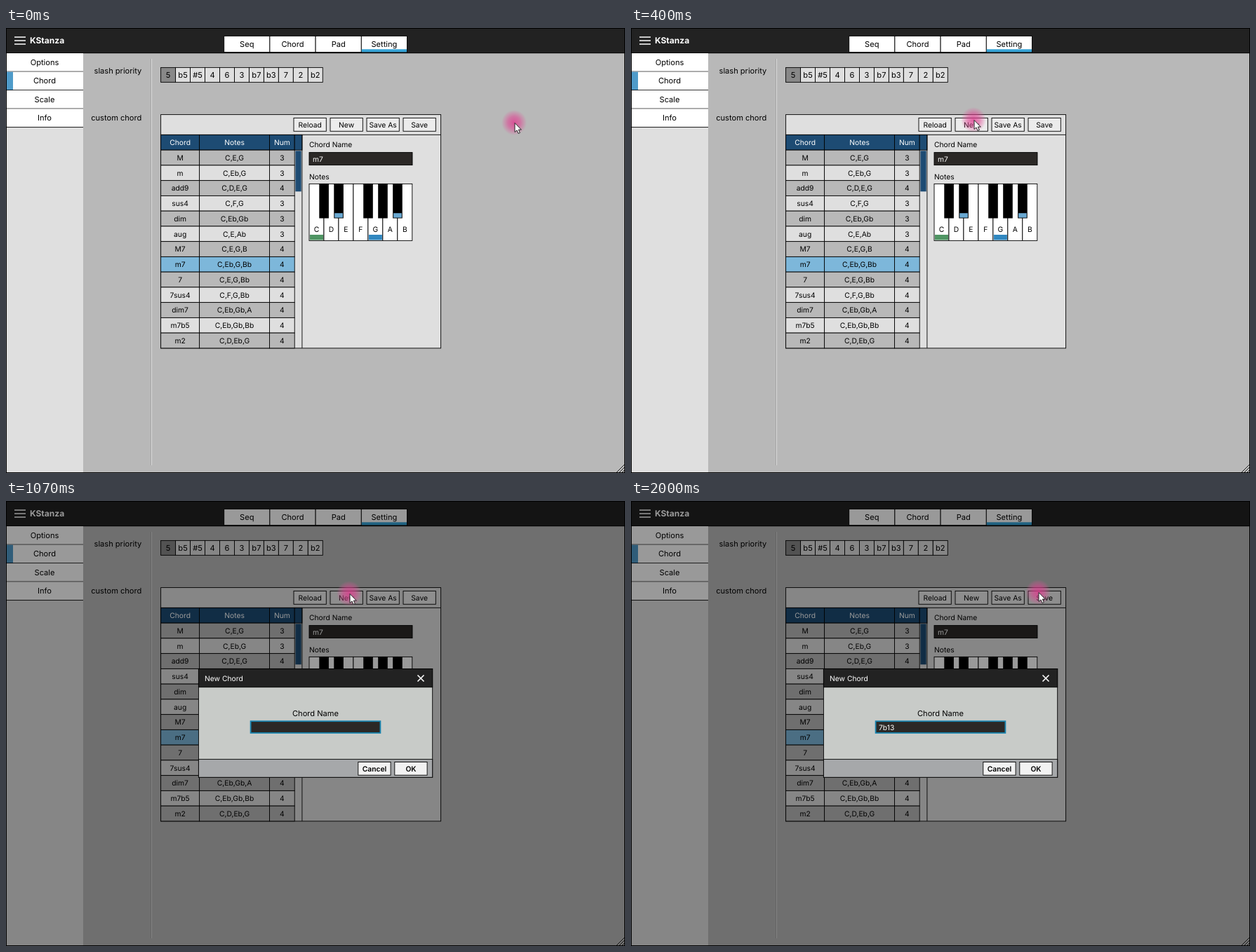
Animation, 882 px wide and 635 px high, one loop 2.07 s. Source, as an HTML page with a canvas:

```html
<!DOCTYPE html>
<html lang="en">
<head>
<meta charset="utf-8">
<title>Chord settings</title>
<style>
html, body { margin: 0; width: 100%; height: 100%; overflow: hidden; background: #b8b8b8; }
canvas { display: block; }
</style>
</head>
<body>
<canvas id="stage" width="882" height="635"></canvas>
<script>
const ctx = document.getElementById('stage').getContext('2d');
ctx.textRendering = 'geometricPrecision';
const LOOP = 2070, SMALL = 10.3, MEDIUM = 11.1, HAIR = 0.9;
const NAVY = '#1d4b73', PANEL = '#dfdfdf', GREY = '#b8b8b8', INK = '#2b2826';
const KEY = 20.97, ROW = 21.75, ITEM = 26.46;

// Pointer stops: time, x, y
const stops = [
  [0, 724, 135], [70, 590, 130], [140, 487, 128], [200, 479, 130], [270, 483, 131],
  [400, 488, 131], [600, 489, 132], [1940, 535, 131], [2000, 580, 130]
];
const chords = [
  'M C,E,G', 'm C,Eb,G', 'add9 C,D,E,G', 'sus4 C,F,G', 'dim C,Eb,Gb', 'aug C,E,Ab', 'M7 C,E,G,B',
  'm7 C,Eb,G,Bb', '7 C,E,G,Bb', '7sus4 C,F,G,Bb', 'dim7 C,Eb,Gb,A', 'm7b5 C,Eb,Gb,Bb', 'm2 C,D,Eb,G'
].map(row => row.split(' '));

function fill(x, y, w, h, color) {
  ctx.fillStyle = color;
  ctx.fillRect(x, y, w, h);
}

// x, y, w and h follow the middle of the outline
function box(x, y, w, h, color) {
  fill(x, y, w, h, color);
  ctx.strokeStyle = '#000';
  ctx.lineWidth = HAIR;
  ctx.strokeRect(x, y, w, h);
}

function text(str, x, y, size = SMALL, color = '#000', align = 'center', weight = 400) {
  ctx.font = `${weight} ${size}px Inter, sans-serif`;
  ctx.textAlign = align;
  ctx.fillStyle = color;
  ctx.fillText(str, x, y + size * 0.364);
}

function line(x1, y1, x2, y2, color = '#000', width = HAIR) {
  ctx.strokeStyle = color;
  ctx.lineWidth = width;
  ctx.beginPath();
  ctx.moveTo(x1, y1);
  ctx.lineTo(x2, y2);
  ctx.stroke();
}

function drawHeader() {
  fill(0, 0, 882, 36, '#222');
  for (const y of [13, 18, 23]) line(12, y, 28, y, '#fff', 1.5);
  text('KStanza', 34, 18, 12, '#fff', 'left', 700);
  ['Seq', 'Chord', 'Pad', 'Setting'].forEach((label, i) => {
    const x = 310.7 + i * 65.2;
    box(x, 11.4, 65.2, 23.2, '#fff');
    if (i === 3) fill(x + 0.5, 30.3, 64.2, 4, '#36a3d6');
    text(label, x + 32.6, 23, MEDIUM);
  });
  line(0, 35.7, 882, 35.7);
}

function drawSidebar() {
  fill(0, 36, 110, 599, PANEL);
  ['Options', 'Chord', 'Scale', 'Info'].forEach((label, i) => {
    const y = 35.7 + i * ITEM;
    fill(0, y + 0.4, 110, ITEM, '#fff');
    if (i === 1) fill(1, y + 0.4, 9, ITEM, '#4f9bc9');
    line(0, y + ITEM, 110, y + ITEM);
    text(label, 55, y + ITEM / 2, MEDIUM);
  });
}

function drawPriority() {
  fill(206, 44, 1, 580, '#a4a4a4');
  fill(207, 44, 1, 580, '#dcdcdc');
  text('slash priority', 193.3, 61, MEDIUM, '#000', 'right');
  text('custom chord', 193.3, 128, MEDIUM, '#000', 'right');
  '5 b5 #5 4 6 3 b7 b3 7 2 b2'.split(' ').forEach((label, i) => {
    const x = 220.6 + i * KEY;
    box(x, 56.4, KEY, KEY, i ? PANEL : '#888');
    text(label, x + KEY / 2, 67, MEDIUM);
  });
}

function drawRow(index, cells, color, ink) {
  const edges = [220.6, 275.6, 375.5, 411.2];
  const y = 152.4 + index * ROW;
  cells.forEach((cell, i) => {
    box(edges[i], y, edges[i + 1] - edges[i], ROW, color);
    text(cell, (edges[i] + edges[i + 1]) / 2, y + ROW / 2, SMALL, ink);
  });
}

function drawTable() {
  box(220.6, 123.6, 399, 333.3, PANEL);
  line(220.6, 152.4, 619.6, 152.4);
  ['Reload', 'New', 'Save As', 'Save'].forEach((label, i) => {
    box(410 + i * 52, 128.4, 46.3, 18.9, '#ececec');
    text(label, 433.1 + i * 52, 138);
  });
  drawRow(0, ['Chord', 'Notes', 'Num'], NAVY, '#fff');
  chords.forEach(([name, notes], i) => {
    const color = i === 7 ? '#7db7da' : i % 2 ? PANEL : GREY;
    drawRow(i + 1, [name, notes, notes.split(',').length], color, '#000');
  });
  box(411.2, 152.4, 10.7, ROW, NAVY);
  line(421.9, 152.4, 421.9, 456.9);
  fill(412.4, 175.3, 8.3, 58, NAVY);
}

function drawEditor() {
  text('Chord Name', 432, 166, SMALL, '#000', 'left');
  box(432, 177.6, 147, 18, INK);
  text('m7', 437, 187, SMALL, '#fff', 'left');
  text('Notes', 432, 212, SMALL, '#000', 'left');
  [...'CDEFGAB'].forEach((note, i) => {
    const x = 432 + i * KEY;
    box(x, 222.4, KEY, 81, '#fff');
    if (note === 'C') fill(x + 1, 295, 19, 7.5, '#4f9563');
    if (note === 'G') fill(x + 1, 295, 19, 7.5, '#3087c0');
    text(note, x + KEY / 2, 287.5);
  });
  for (const i of [0, 1, 3, 4, 5]) {
    const x = 446.3 + i * KEY;
    fill(x, 222, 13.6, 49.5, '#000');
    if (i === 1 || i === 5) fill(x + 1, 264.2, 11.6, 6.4, '#6aa9d2');
  }
}

function drawFrame() {
  ctx.strokeStyle = '#000';
  ctx.lineWidth = 1;
  ctx.strokeRect(0.5, 0.5, 881, 634);
  for (const d of [3, 7, 11]) {
    line(881 - d, 634, 881, 634 - d);
    line(880 - d, 634, 881, 633 - d, '#ddd', 0.6);
  }
}

function drawDialog(t) {
  fill(0, 0, 882, 635, 'rgba(0,0,0,.4)');
  box(274.4, 239.5, 333.3, 154.8, '#c8cbc8');
  box(274.4, 239.5, 333.3, 26.2, '#222');
  text('New Chord', 283, 253, SMALL, '#fff', 'left');
  line(586.5, 248.5, 595.5, 257.5, '#fff', 1.6);
  line(595.5, 248.5, 586.5, 257.5, '#fff', 1.6);
  text('Chord Name', 441, 302.5, MEDIUM);
  fill(347.7, 313.3, 186.6, 18.6, '#1a84ae');
  fill(349.5, 315.1, 183, 15, INK);
  if (t >= 1400) text('7b13', 353, 323, SMALL, '#fff', 'left');
  if (t < 1070) fill(353, 316, 1, 13, '#ddd');
  if (t >= 1400 && t < 1800) fill(376, 316, 1, 13, '#ddd');
  box(274.4, 368.6, 333.3, 25.7, '#a6a8aa');
  ['Cancel', 'OK'].forEach((label, i) => {
    box(501.8 + i * 52, 372.5, 46.3, 18.7, '#f2f2f2');
    text(label, 525 + i * 52, 382, SMALL, '#000', 'center', 600);
  });
}

function drawPointer(t) {
  const [, x, y] = stops.findLast(stop => stop[0] <= t);
  const glow = ctx.createRadialGradient(x, y, 0, x, y, 18);
  glow.addColorStop(0, 'rgba(224,56,142,.8)');
  glow.addColorStop(0.5, 'rgba(224,66,146,.55)');
  glow.addColorStop(0.8, 'rgba(224,80,152,.25)');
  glow.addColorStop(1, 'rgba(224,80,152,0)');
  fill(x - 18, y - 18, 36, 36, glow);
  ctx.save();
  ctx.translate(x + 1, y + 0.5);
  const arrow = new Path2D('M0 0V13L3 10.4L5 15L7.3 14L5.3 9.6H9.3Z');
  ctx.strokeStyle = '#222';
  ctx.lineWidth = 1;
  ctx.fillStyle = '#fff';
  ctx.fill(arrow);
  ctx.stroke(arrow);
  ctx.restore();
}

function draw() {
  const t = performance.now() % LOOP;
  fill(0, 0, 882, 635, GREY);
  drawHeader();
  drawSidebar();
  drawPriority();
  drawTable();
  drawEditor();
  drawFrame();
  if (t >= 670) drawDialog(t);
  drawPointer(t);
  requestAnimationFrame(draw);
}
draw();
</script>
</body>
</html>
```
